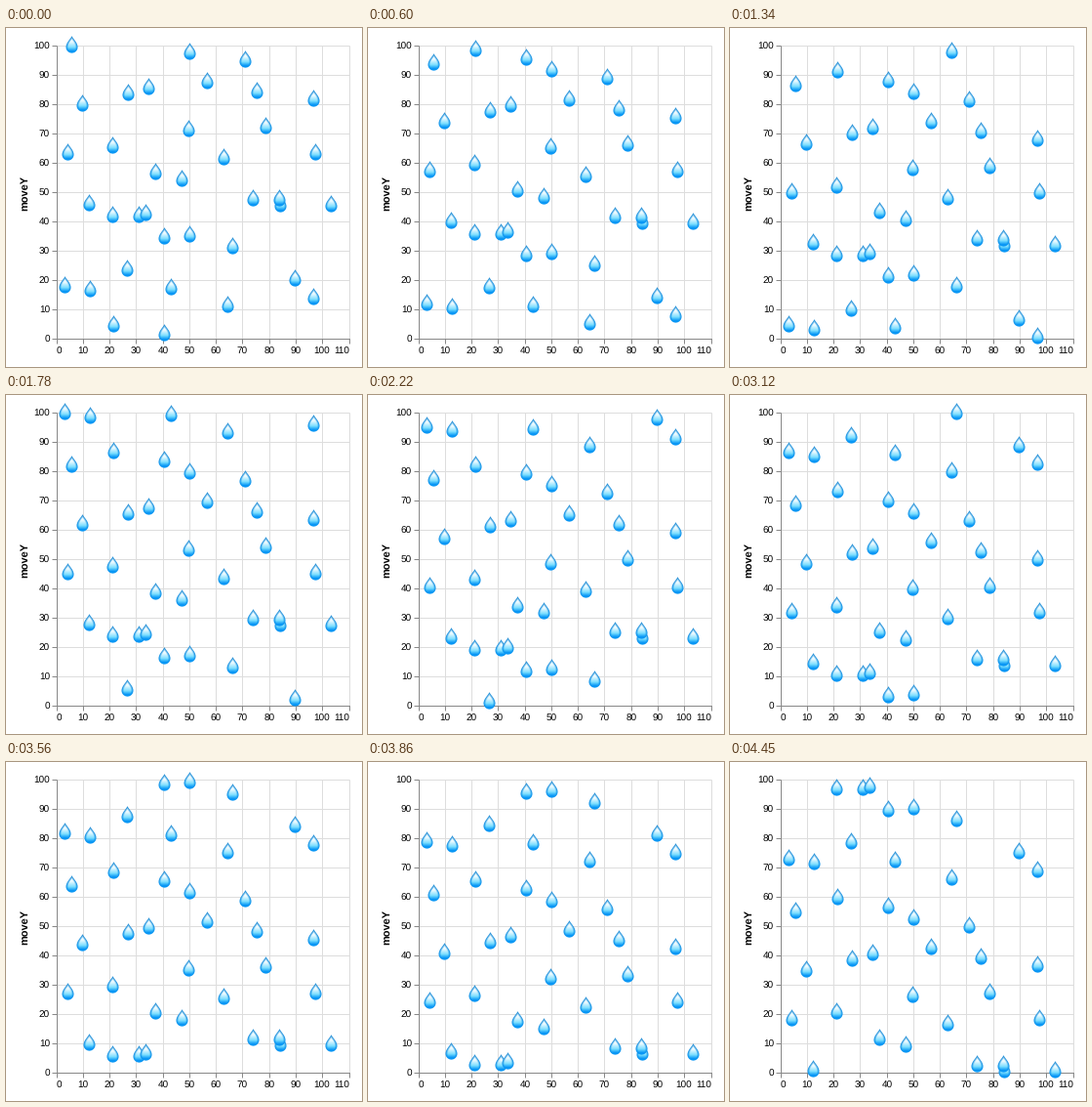
A matplotlib script for the animation above (4470 ms loop, 365x347 px).

```python
import numpy as np
import matplotlib.pyplot as plt
from matplotlib.animation import FuncAnimation
from matplotlib.collections import LineCollection

plt.rcParams["text.hinting"] = "none"

W, H, DPI = 365, 347, 100
PX = 72 / DPI                      # one pixel in points
LEFT, TOP, SIZE = 52, 18, 300      # plot area
LOOP_MS, TICK_MS = 4470, 10
STEP_MS, LAST_STEP = 148.333, 30
FALL = 4.5                         # pixels per step
WRAP_TOP = 15

# where each drop starts, in pixels
DROPS = np.array([
    (67, 16), (60, 262), (63, 126), (78, 76), (85, 178), (86, 266),
    (109, 119), (109, 190), (110, 302), (124, 245), (125, 65), (146, 59),
    (136, 190), (143, 188), (153, 146), (162, 212), (162, 311), (169, 264),
    (180, 153), (187, 102), (188, 23), (188, 210), (206, 53), (223, 131),
    (227, 282), (232, 222), (245, 31), (253, 173), (257, 63), (266, 99),
    (281, 179), (280, 173), (296, 255), (315, 71), (315, 274), (317, 126),
    (333, 179),
])


def mix(a, b, amount):
    return a + (b - a) * amount[..., None]


def drop_sprite(w=15, h=21, ss=8):
    """Shaded water drop as premultiplied RGBA, tip one pixel below the top."""
    radius, belly, length = 6.0, 11.6, 17.6
    yy, xx = np.mgrid[0:h * ss, 0:w * ss]
    x = np.abs((xx + 0.5) / ss - w / 2)
    y = (yy + 0.5) / ss - 1
    cone = radius * np.sin(np.pi / 2 * np.clip(y / belly, 0, 1)) ** 1.3
    ball = np.sqrt(np.clip(radius ** 2 - (y - belly) ** 2, 0, None))
    inside = (x < np.where(y < belly, cone, ball)) & (y > 0)
    half = np.where(y < belly, cone, ball)

    t = np.clip(y / length, 0, 1)
    white, cyan = np.array([238, 251, 255]), np.array([110, 218, 255])
    blue, rim = np.array([8, 150, 245]), np.array([22, 134, 208])
    body = mix(white, cyan, np.clip((t - 0.35) / 0.35, 0, 1))
    body = mix(body, blue, np.clip((t - 0.68) / 0.2, 0, 1))
    edge = np.clip(1.15 - (half - x) / 2.2, 0, 1)
    color = mix(body, mix(rim, blue, t), edge) / 255

    img = np.dstack([color, np.ones_like(t)]) * inside[..., None]
    return img.reshape(h, ss, w, ss, 4).mean(axis=(1, 3))


SPRITE = drop_sprite()


def drop_layer(step):
    layer = np.zeros((H, W, 4))
    h, w = SPRITE.shape[:2]
    for x, start in DROPS:
        y = (start + FALL * step - WRAP_TOP) % SIZE + WRAP_TOP
        r, c = int(round(y)) - 9, x - w // 2
        area = layer[r:r + h, c:c + w]
        area[:] = SPRITE + area * (1 - SPRITE[..., 3:])
    layer[..., :3] /= np.maximum(layer[..., 3:], 1e-6)
    return (np.clip(layer, 0, 1) * 255).round().astype(np.uint8)


fig = plt.figure(figsize=(W / DPI, H / DPI), dpi=DPI, facecolor="white")
ax = fig.add_axes([0, 0, 1, 1])
ax.set(xlim=(0, W), ylim=(H, 0))
ax.axis("off")


def label(x, y, text, ha, **kw):
    style = dict(size=10 * PX, family="Liberation Sans", va="baseline")
    ax.text(x, y, text, ha=ha, color="black", **{**style, **kw})


left, top = LEFT + 0.5, TOP + 0.5
right, bottom = left + SIZE, top + SIZE
grid = []
axis = [[(left, top), (left, bottom + 0.5)],
        [(left, bottom), (right + 0.5, bottom)]]

for i in range(12):
    x = LEFT + SIZE * i // 11 + 0.5
    grid.append([(x, top), (x, bottom)])
    axis.append([(x, bottom), (x, bottom + 5)])
    ha = "left" if i == 0 else "right" if i == 11 else "center"
    label(x - 0.5, 333.6, str(10 * i), ha)

for i in range(11):
    y = bottom - 30 * i
    grid.append([(left, y), (right, y)])
    axis.append([(left - 5, y), (left, y)])
    label(45, y + 3, str(10 * i), "right")

label(19.5, 168.5, "moveY", "center", va="center", rotation=90,
      size=11 * PX, weight="bold")

# half-pixel centres are already crisp, so snapping stays off
for lines, color in ((grid, "#dddddd"), (axis, "#888888")):
    ax.add_collection(LineCollection(lines, colors=color, linewidths=PX,
                                     snap=False))

drops = fig.figimage(drop_layer(0), 0, 0, origin="upper", zorder=5)
layers = [drop_layer(step) for step in range(LAST_STEP + 1)]


def update(i):
    step = int((i * TICK_MS + 5.1) / STEP_MS)
    drops.set_data(layers[min(step, LAST_STEP)])
    return [drops]


anim = FuncAnimation(fig, update, frames=LOOP_MS // TICK_MS, interval=TICK_MS,
                     repeat=True, repeat_delay=0, cache_frame_data=False)
plt.show()
```
